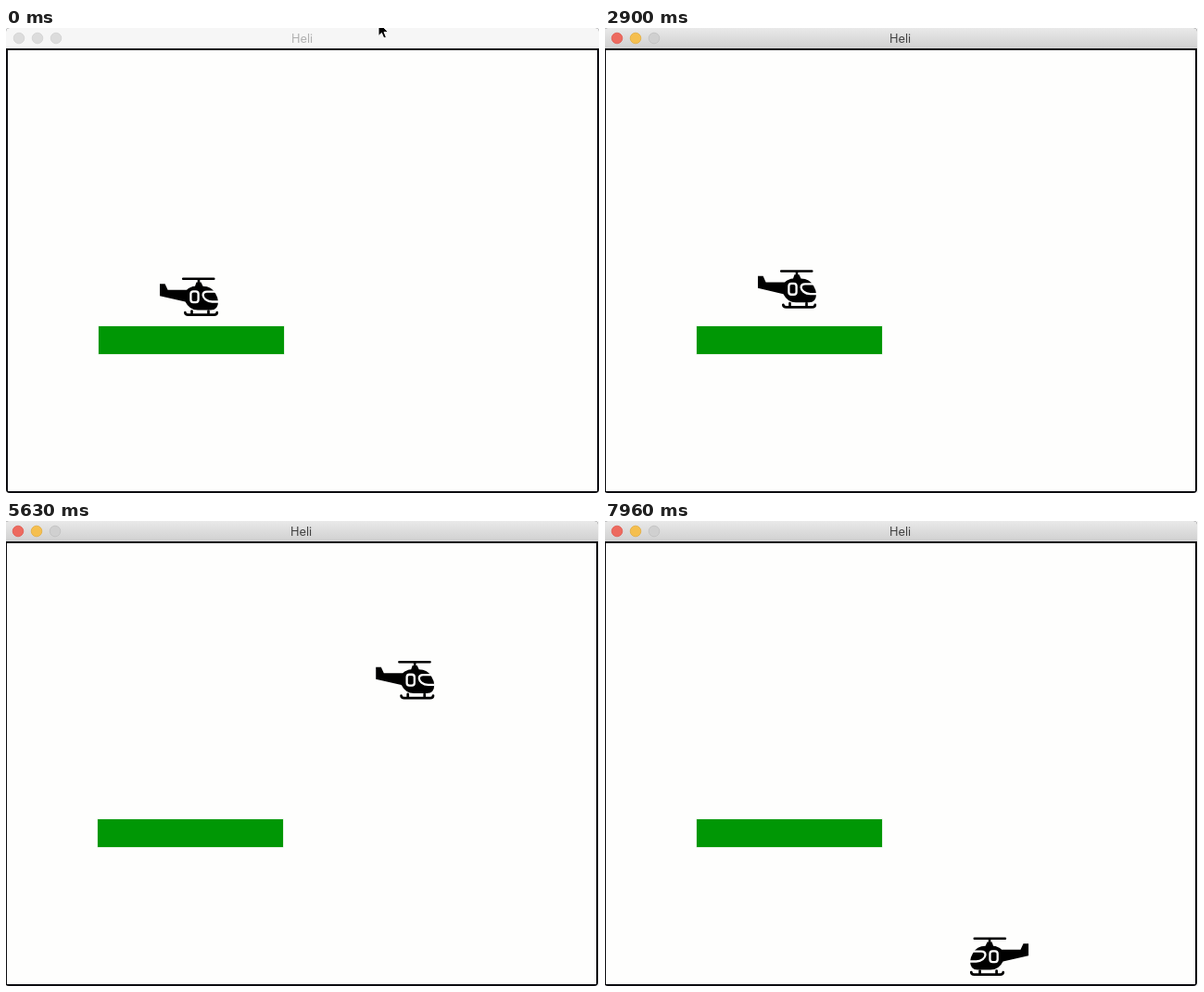
Recreate the animation shown at these times as an HTML page. Size 640 px wide and 502 px high, loop 8000 ms.

```html
<!DOCTYPE html>
<html lang="en">
<head>
<meta charset="utf-8">
<title>Heli</title>
<style>
  html, body { margin: 0; width: 100%; height: 100%; overflow: hidden; background: #f4f4f4; }
  svg { display: block; width: 640px; height: 502px; }
  text { font: 12.8px Inter, "Open Sans", sans-serif; text-anchor: middle; fill: #b0b0b0; }
  .bar { fill: #f6f6f6; }
  .light { fill: #dcdcdc; stroke: #d2d2d2; stroke-width: .8; }
  .active text { fill: #404040; }
  .active .bar { fill: url(#metal); }
  .active .light { fill: #d0d0d0; stroke: #c0c0c0; }
  .active .close { fill: #ed6a5f; stroke: #e0594f; }
  .active .mini { fill: #f5bf4f; stroke: #e2ac40; }
</style>
</head>
<body>
<svg viewBox="0 0 640 502">
  <defs>
    <linearGradient id="metal" x2="0" y2="1">
      <stop offset="0" stop-color="#e9e9e9"/>
      <stop offset="1" stop-color="#d0d0d0"/>
    </linearGradient>
  </defs>
  <g id="window">
    <path d="M0 22V4Q0 0 4 0H636Q640 0 640 4V498Q640 502 636 502H4Q0 502 0 498Z" fill="#0c0c10"/>
    <path class="bar" d="M0 22V4Q0 0 4 0H636Q640 0 640 4V22Z"/>
    <circle class="light close" cx="14" cy="11" r="5.8"/>
    <circle class="light mini" cx="34" cy="11" r="5.8"/>
    <circle class="light" cx="54" cy="11" r="5.8"/>
    <text x="319.5" y="16">Heli</text>
    <rect x="2" y="24" width="636" height="476" fill="#fefefd"/>
    <rect x="100" y="322" width="200" height="30" fill="#009705" stroke="#009705" stroke-opacity=".2"/>
    <g id="heli" fill="none" stroke-linecap="round" stroke-linejoin="round">
      <path fill="#000" d="M0 6.7H5.6L8.6 13.3H29Q33 9.6 38 9.3L39.5 5H44.5L46.5 9.3Q56 9.6 60 17Q63 22 63 26Q63 35 55 35H41Q32 35 27.5 26L0 19.7Z"/>
      <path stroke="#000" stroke-width="2.6" d="M25.2 1.3H58.3M42 2V7"/>
      <path stroke="#000" stroke-width="2.7" d="M27.3 37.6Q27.6 40.2 30.5 40.2H58.5Q61.8 40.2 61.8 37.6M34.5 36V40M52.5 36V40"/>
      <rect x="33.4" y="14.8" width="8.2" height="11.8" rx="2.8" stroke="#fff" stroke-width="2.3"/>
      <path stroke="#fff" stroke-width="2.3" stroke-linecap="butt" d="M60.5 15.2H51Q46.6 15.2 46.6 19Q46.8 21.5 49.4 23.6Q52.4 26 56.5 26H63.5"/>
    </g>
  </g>
  <path id="cursor" d="M0 0V14.5L3.4 11.4L5.8 17L8.4 15.9L6 10.4H10.6Z" fill="#000" stroke="#fff" stroke-width="1"/>
</svg>
<script>
  // Time is counted in game steps, lengths in pixels.
  const LOOP = 8000, STEP = 1000 / 15;
  const GRAVITY = 1.65, MAX_FALL = 14, SPEED = 10.25, FLOOR = 180;
  const ACTIVATE = 3, CURSOR_GONE = 9;
  const ground = { at: 40, y: 0 }, dip = { at: 71.5, y: -10 };
  const hop = { at: 33.5, y: -12.5 }, first = { at: 56.5, y: -119 }, second = { at: 86.8, y: -125 };
  const flyRight = { from: 46.15, to: 69 }, goOn = { from: 87.2, to: 96 }, flyBack = { from: 98, to: 107.3 };

  const byId = id => document.getElementById(id);
  const win = byId('window'), heli = byId('heli'), cursor = byId('cursor');
  const clamp = (v, lo, hi) => Math.min(hi, Math.max(lo, v));

  // Gravity alone near the peak, steady engine thrust near the low end; both meet at the same speed.
  function arc(peak, low, n) {
    const span = Math.abs(low.at - peak.at), vMax = 2 * (low.y - peak.y) / span;
    const free = vMax / GRAVITY, s = Math.abs(n - peak.at);
    return s < free
      ? peak.y + GRAVITY * s * s / 2
      : low.y - vMax / (span - free) * (span - s) ** 2 / 2;
  }

  function fall(peak, floor, n) {
    const s = n - peak.at, free = Math.min(s, MAX_FALL / GRAVITY);
    return Math.min(floor, peak.y + GRAVITY * free * free / 2 + MAX_FALL * (s - free));
  }

  function height(n) {
    if (n < 29) return 0;
    if (n < hop.at) return arc(hop, { at: 29, y: 0 }, n);
    if (n < ground.at) return fall(hop, 0, n);
    if (n < first.at) return arc(first, ground, n);
    if (n < dip.at) return arc(first, dip, n);
    if (n < second.at) return arc(second, dip, n);
    return fall(second, FLOOR, n);
  }

  const held = (key, n) => clamp(n, key.from, key.to) - key.from;
  const across = n => SPEED * (held(flyRight, n) + held(goOn, n) - held(flyBack, n));

  function draw(now) {
    const n = Math.floor((now % LOOP - 26) / STEP);
    const active = n >= ACTIVATE, flipped = n > flyBack.from;
    win.setAttribute('class', active ? 'active' : '');
    win.setAttribute('transform', `translate(${active ? -1 : 0} 0)`);
    const x = 166 + across(n) + (flipped ? 63 : 0);
    heli.setAttribute('transform', `translate(${x} ${269.5 + height(n)}) scale(${flipped ? -1 : 1} 1)`);

    const reach = clamp(Math.min((n + 1) / 5, (CURSOR_GONE - n) / 2), 0, 1);
    cursor.setAttribute('transform', `translate(${402 - 7 * reach} ${8 * reach - 6})`);
    cursor.style.display = n < CURSOR_GONE ? '' : 'none';
  }

  const start = performance.now();
  function tick() {
    draw(performance.now() - start);
    requestAnimationFrame(tick);
  }
  tick();
</script>
</body>
</html>
```
